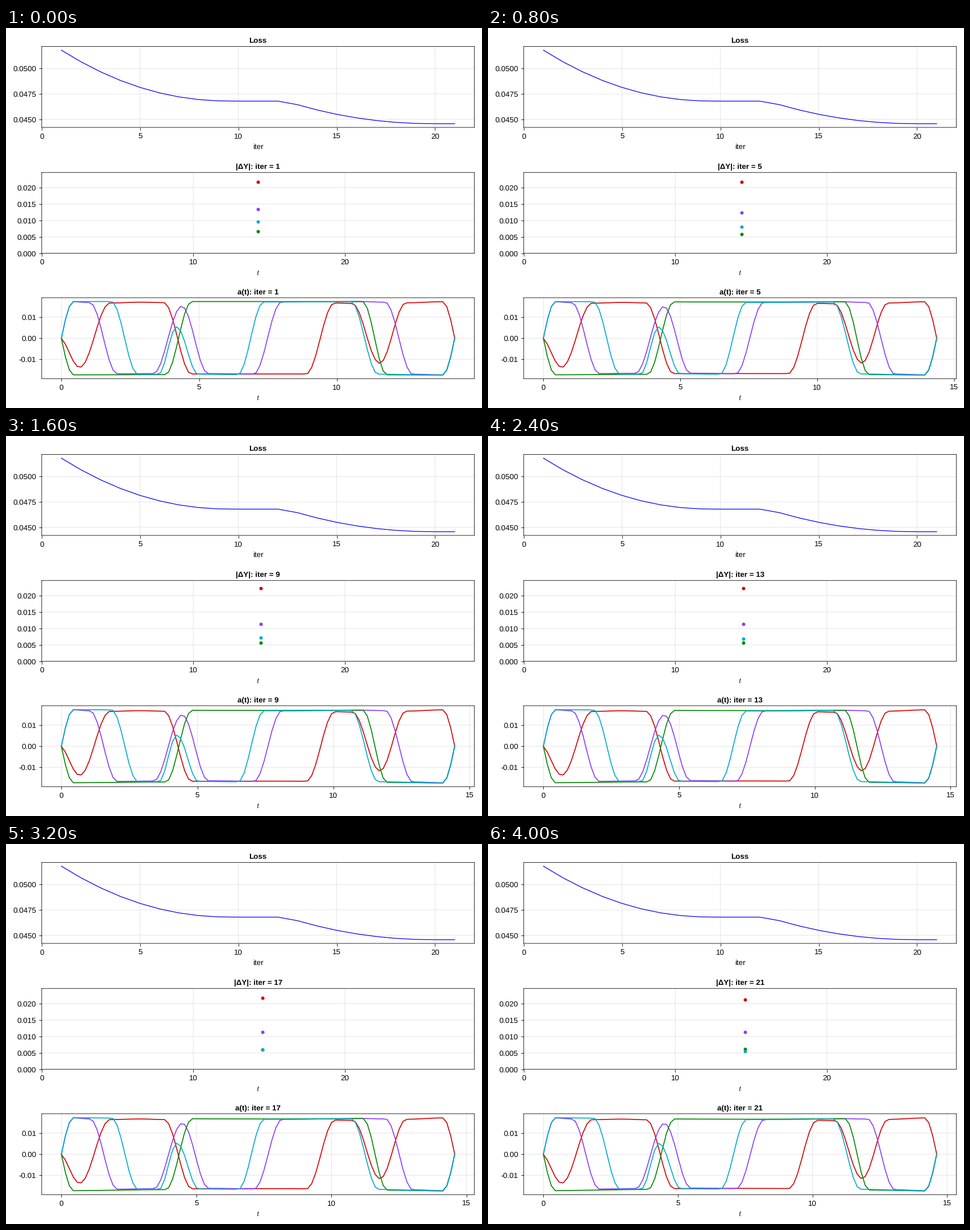
Write a matplotlib script that moves like this. It is 837 by 669 pixels and loops after 4.2 s.

```python
import matplotlib.pyplot as plt
import numpy as np
from matplotlib.animation import FuncAnimation
from matplotlib.ticker import FormatStrFormatter, MultipleLocator

W, H, DPI = 837, 669, 64
PX = 72 / DPI  # points per pixel
SCALE = 0.837  # stage pixels per layout unit
LEFT, RIGHT, PANEL_HEIGHT = 62.8, 823.6, 142.4
ITERS = 21
RED, PURPLE, GREEN, CYAN = "#d60000", "#8c3bff", "#018700", "#00acc6"

plt.rcParams.update({
    "font.family": "Liberation Sans",
    "font.size": 16 * SCALE * PX,
    "mathtext.fontset": "cm",
    "text.hinting": "none",
    "path.snap": False,
    "axes.linewidth": SCALE * PX,
    "axes.unicode_minus": False,
})

# The run lengthens steadily, with a stall in the middle and at the end
iters = np.arange(1, ITERS + 1)
duration = np.interp(iters, [1, 9, 10, 11, 12, 13, 20, 21],
                     [14.275, 14.455, 14.457, 14.48, 14.48, 14.49, 14.617, 14.617])


def decay(end, span):
    return (np.maximum(end - iters, 0) / span) ** 2.1


# Two successive descents, the second starting after a plateau
loss = np.where(iters < 13,
                0.04679 + 0.00502 * decay(9.6, 8.6),
                0.04456 + 0.00188 * decay(20, 7))

# Final errors in units of 1e-5 at a few iterations
ERROR_ITERS = np.array([1, 5, 9, 13, 21])
ERRORS = {
    RED: [2181, 2181, 2230, 2230, 2126],
    PURPLE: [1343, 1244, 1141, 1141, 1132],
    GREEN: [674, 584, 567, 562, 622],
    CYAN: [963, 800, 714, 686, 548],
}

# Turning points (sample index, level in 1e-4) joined by cosine easing;
# points outside 0..99 make a signal enter or leave at mid-swing
SAMPLES = np.arange(100)
TURNS = {
    RED: [(-.7, 5), (4.6, -139), (12.2, 167), (20, 171), (25.8, 169), (32.7, -170),
          (61.6, -170), (68.7, 167), (73.2, 165), (80.1, -119), (86.7, 168),
          (96, 173), (102, -173)],
    PURPLE: [(-3, -174), (3, 173), (7.2, 169), (14, -169), (23.2, -168), (30.3, 152),
             (36.9, -168), (48.4, -171), (55.4, 172), (75, 174), (81.5, 171),
             (88.4, -171), (96, -174), (102, 174)],
    GREEN: [(-3, 174), (3, -174), (26.2, -173), (32.8, 174), (75.8, 174),
            (81.9, -174), (96, -175), (102, 175)],
    CYAN: [(-3, -174), (3, 174), (12.6, 174), (19.2, -171), (24.5, -171), (29, 54),
           (34.4, -171), (44.4, -173), (50.9, 172), (72.9, 173), (79.7, -171),
           (96, -175), (102, 175)],
}


def ease_through(turns, at):
    index, level = np.array(turns).T
    seg = np.clip(np.searchsorted(index, at, side="right") - 1, 0, len(index) - 2)
    part = (at - index[seg]) / (index[seg + 1] - index[seg])
    return level[seg] + (level[seg + 1] - level[seg]) * np.sin(np.pi / 2 * part) ** 2


def signal(color, progress):
    """Later iterations swing slightly later and lower towards the middle."""
    middle = progress * np.sin(np.pi * SAMPLES / SAMPLES[-1])
    swing = ease_through(TURNS[color], SAMPLES - 0.2 * middle)
    return 1e-4 * swing * (1 - 0.045 * middle)


fig = plt.figure(figsize=(W / DPI, H / DPI), dpi=DPI, facecolor="white")


def make_panel(top, xstep, ystep, yformat, xlabel):
    bottom = top + PANEL_HEIGHT
    ax = fig.add_axes([LEFT / W, 1 - bottom / H, (RIGHT - LEFT) / W, PANEL_HEIGHT / H])
    ax.set_axisbelow(True)
    ax.grid(color="#e0e0e0", linewidth=SCALE * PX)
    ax.tick_params(length=6 * SCALE * PX, width=SCALE * PX)
    ax.tick_params(axis="x", pad=5 * PX)
    ax.tick_params(axis="y", pad=4.5 * PX)
    ax.xaxis.set_major_locator(MultipleLocator(xstep))
    ax.yaxis.set_major_locator(MultipleLocator(ystep))
    ax.yaxis.set_major_formatter(FormatStrFormatter(yformat))
    fig.text((LEFT + RIGHT) / 2 / W, 1 - (bottom + 37.7) / H, xlabel,
             ha="center", va="baseline")
    return ax


def set_title(ax, text):
    ax.set_title(text, fontsize=16 * SCALE * PX, fontweight="bold", pad=5.7 * PX)


loss_ax = make_panel(32.6, 5, 0.0025, "%.4f", "iter")
error_ax = make_panel(254.3, 10, 0.005, "%.3f", "$t$")
signal_ax = make_panel(474.9, 5, 0.01, "%.2f", "$t$")

set_title(loss_ax, "Loss")
loss_ax.plot(iters, loss, color="blue", linewidth=1.5 * SCALE * PX)
error_ax.set(xlim=(0, 2 * duration[0]), ylim=(0, 0.02463))
signal_ax.set_ylim(-0.0192, 0.0192)

dots = {c: error_ax.plot([], [], "o", color=c, markersize=6 * PX, markeredgewidth=0)[0]
        for c in TURNS}
lines = {c: signal_ax.plot([], [], color=c, linewidth=2 * SCALE * PX)[0] for c in TURNS}


def update(frame):
    total = duration[frame]
    progress = (total - duration[0]) / (duration[-1] - duration[0])
    set_title(error_ax, f"|ΔY|: iter = {frame + 1}")
    set_title(signal_ax, f"a(t): iter = {frame + 1}")
    signal_ax.set_xlim(-0.05 * total, 1.05 * total)
    times = np.linspace(0, total, len(SAMPLES))
    for color in TURNS:
        error = np.interp(total, duration[ERROR_ITERS - 1], ERRORS[color])
        dots[color].set_data([total], [1e-5 * error])
        lines[color].set_data(times, signal(color, progress))
    return [*dots.values(), *lines.values()]


anim = FuncAnimation(fig, update, frames=ITERS, interval=200, repeat=True,
                     repeat_delay=0, blit=False)
plt.show()
```
